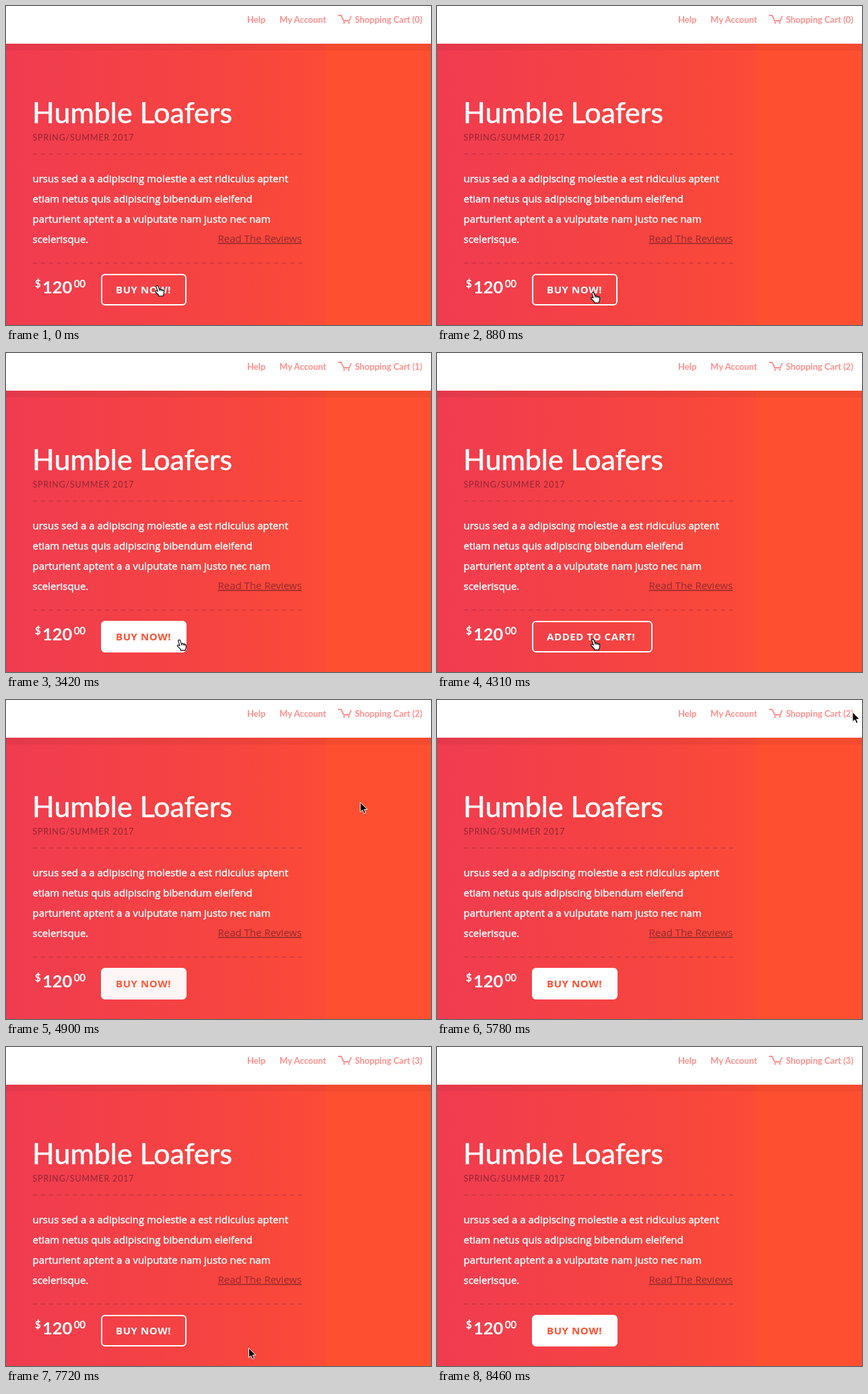
These frames come from a looping animation (631 px wide and 474 px high, 8.91 s). An HTML page:

```html
<!DOCTYPE html>
<html lang="en">
<head>
<meta charset="utf-8">
<title>Shop page</title>
<style>
html, body { margin: 0; width: 100%; height: 100%; overflow: hidden; background: #fff; }
svg { display: block; }
text { fill: #fff; font-family: Lato, sans-serif; white-space: pre; }
.nav text { font-size: 13px; font-weight: 700; fill: #ff8e8c; }
.title { font-size: 43px; stroke: #fff; stroke-width: .6; }
.season { font-size: 12.5px; letter-spacing: .8px; fill: #932633; }
.copy text, .link { font: 15px "Open Sans", sans-serif; }
.copy text { stroke: #fff; stroke-width: .45; }
.link { fill: #932a2b; text-decoration: underline; }
.price { stroke: #fff; stroke-width: .6; }
#label { font: 700 15px "Open Sans", sans-serif; letter-spacing: .6px; }
.dash { stroke: #a3263f; stroke-opacity: .36; stroke-width: 2; stroke-dasharray: 6 5.94; }
</style>
</head>
<body>
<svg width="631" height="474" viewBox="0 0 631 474">
  <defs>
    <linearGradient id="hero" gradientUnits="userSpaceOnUse" x1="0" x2="631" y1="0" y2="0">
      <stop offset="0" stop-color="#f03c50"/>
      <stop offset=".5" stop-color="#f64440"/>
      <stop offset=".751" stop-color="#fc4b37"/>
      <stop offset=".751" stop-color="#ff4f31"/>
    </linearGradient>
  </defs>
  <rect width="631" height="474" fill="#fff"/>
  <rect y="56" width="631" height="418" fill="url(#hero)"/>
  <rect y="56" width="631" height="10" fill="#000" opacity=".05"/>

  <g class="nav">
    <text x="358" y="25">Help</text>
    <text x="406" y="25">My Account</text>
    <text x="518" y="25" id="cart"></text>
    <path d="M493 14h4.5l4 8h8l3-7" fill="none" stroke="#ff8e8c" stroke-width="1.8"/>
    <g fill="#ff8e8c"><circle cx="502" cy="25" r="1.4"/><circle cx="509" cy="25" r="1.4"/></g>
  </g>

  <text class="title" x="39" y="174">Humble Loafers</text>
  <text class="season" x="39.5" y="200">SPRING/SUMMER 2017</text>
  <path class="dash" d="M40 220H440M40 382H440"/>
  <g class="copy">
    <text x="39.5" y="262">ursus sed a a adipiscing molestie a est ridiculus aptent</text>
    <text x="39.5" y="292">etiam netus quis adipiscing bibendum eleifend</text>
    <text x="39.5" y="322">parturient aptent a a vulputate nam justo nec nam</text>
    <text x="39.5" y="352">scelerisque.</text>
  </g>
  <text class="link" x="314.5" y="351">Read The Reviews</text>

  <g class="price">
    <text x="43" y="418" font-size="15">$</text>
    <text x="54" y="427" font-size="25.5" font-weight="700" stroke="none">120</text>
    <text x="101" y="418" font-size="14.5">00</text>
  </g>

  <rect id="button" x="142" y="399" height="45" rx="5" fill="#fff" stroke="#fff" stroke-width="2"/>
  <text id="label" x="163" y="427"></text>

  <g id="hand" fill="#fff" stroke="#000" stroke-width="1.1" stroke-linejoin="round">
    <path d="M-.8 10L-3 3.2a1.5 1.5 0 0 1 2.8-1L1.6 7q1.8-.9 2.6.4 1.7-.6 2.3.6 1.9-.3 2.1 1.5V12q0 2-1.2 4v1H.5V15.5Q-1.5 13.5-4 11-4.9 9.6-3.7 9.1-2.4 8.8-.8 10z"/>
    <path d="M1.6 7l.6 2.4M4.2 7.6l.4 2M6.5 8.2l.3 1.8" fill="none"/>
  </g>
  <path id="arrow" d="M0 0V14.5L3.3 11.4 5.6 16.6 8 15.6 5.8 10.6H10.5Z" stroke="#fff"/>
</svg>
<script>
const LOOP = 8910, TICK = LOOP / 60;
const CLICKS = [11, 29, 49], ADDED_TICKS = 3;

// Places the pointer visits
const START = [226, 414], BUY = [233, 424], BUY_TOP = [233, 406], ASIDE = [291, 426],
      HERO = [526, 152], CART = [617, 18], EXIT = [650, 500];
// Pointer moves: first tick, last tick, destination
const MOVES = [
  [1, 3, ASIDE], [3, 6, BUY], [18, 20, ASIDE], [22, 25, BUY], [31, 33, HERO],
  [35, 38, CART], [39, 45, BUY_TOP], [45, 46, BUY], [51, 57, EXIT]
];

const $ = id => document.getElementById(id);
const mix = (a, b, k) => a + (b - a) * k;
const easeOut = k => 1 - (1 - k) ** 2;

function pointer(tick) {
  let spot = START;
  for (const [from, to, goal] of MOVES) {
    if (tick <= from) break;
    const k = easeOut(Math.min(1, (tick - from) / (to - from)));
    spot = spot.map((v, i) => mix(v, goal[i], k));
  }
  return spot;
}

function isOver(tick) {
  const [x, y] = pointer(tick);
  return x > 141 && x < 268 && y > 398 && y < 445;
}

// The button fill trails the hover state
const fillAt = tick => mix(!isOver(tick - 1), !isOver(tick - 2), .05);

function setText(el, text) {
  if (el.textContent !== text) el.textContent = text;
}

function draw(time) {
  // The screen refreshes at a low, fixed rate
  const tick = Math.min(59, Math.floor((time % LOOP + 14) / TICK));
  const count = CLICKS.filter(c => tick >= c).length;
  const added = CLICKS.some(c => tick >= c && tick < c + ADDED_TICKS);
  const [x, y] = pointer(tick), over = isOver(tick), fill = fillAt(tick);

  setText($('cart'), `Shopping Cart (${count})`);
  setText($('label'), added ? 'ADDED TO CART!' : 'BUY NOW!');
  $('label').style.fill = `rgb(255,${mix(255, 80, fill)},${mix(255, 48, fill)})`;
  $('button').setAttribute('width', added ? 177 : 125);
  $('button').setAttribute('fill-opacity', fill);
  for (const [id, on] of [['hand', over], ['arrow', !over]]) {
    $(id).setAttribute('transform', `translate(${x} ${y})`);
    $(id).style.display = on ? '' : 'none';
  }
}

const start = performance.now();
(function loop() {
  draw(performance.now() - start);
  requestAnimationFrame(loop);
})();
</script>
</body>
</html>
```
